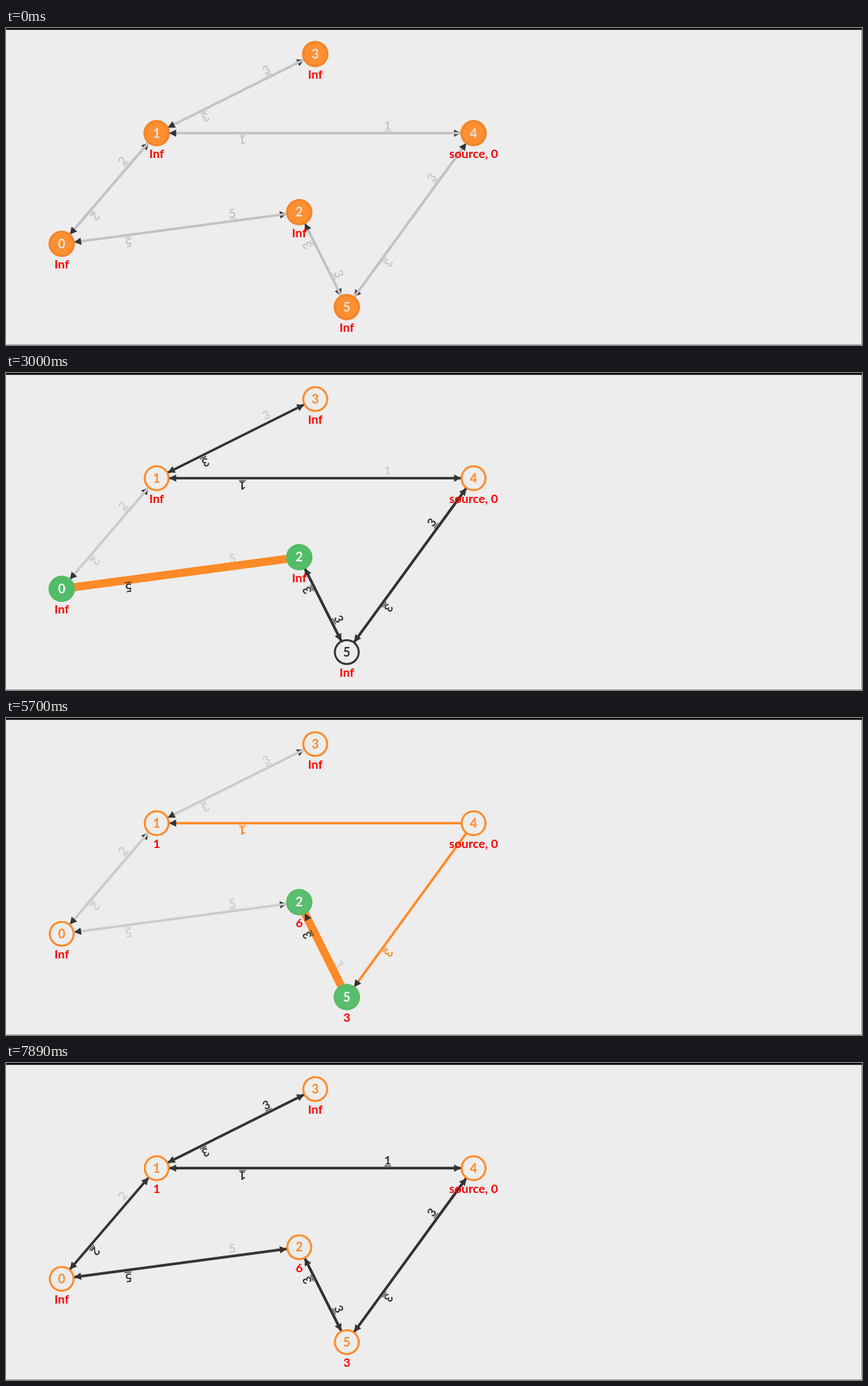
An HTML page with a canvas for the animation above (8 s loop, 1229 by 456 pixels).

```html
<!DOCTYPE html>
<html lang="en">
<head>
<meta charset="utf-8">
<title>Bellman-Ford relaxation</title>
<style>
  html, body { margin: 0; width: 100%; height: 100%; overflow: hidden; background: #ededed; }
  canvas { display: block; }
</style>
</head>
<body>
<canvas id="stage" width="1229" height="456"></canvas>
<script>
const ctx = document.getElementById('stage').getContext('2d');
const LOOP = 8000, STEP = 259.2, LEAD = 45, FADE = 190;
const FONT = 'Lato, "Open Sans", sans-serif';

const BG = [237, 237, 237], DARK = [51, 51, 51], GRAY = [204, 204, 204];
const ORANGE = [255, 138, 39], GREEN = [82, 188, 105], WHITE = [255, 255, 255];
const THIN = 3.5, THICK = 11.5;

const nodes = [[80, 310.5], [216.3, 151.3], [421, 265], [444, 37.5], [671.3, 151.3], [489.3, 401.5]];
const SOURCE = 4;
// [from, to, weight] in the order of relaxation
const edges = [
  [0, 1, 2], [0, 2, 5], [1, 0, 2], [1, 3, 3], [1, 4, 1], [2, 0, 5],
  [2, 5, 3], [3, 1, 3], [4, 1, 1], [4, 5, 3], [5, 2, 3], [5, 4, 3]
];
const reverse = edges.map(([u, v]) => edges.findIndex(e => e[0] === v && e[1] === u));

const look = {
  idle: { ring: DARK, fill: BG, text: DARK, r: 18.6 },
  seen: { ring: ORANGE, fill: BG, text: ORANGE, r: 18.6 },
  full: { ring: ORANGE, fill: ORANGE, text: BG, r: 19 },
  active: { ring: GREEN, fill: GREEN, text: WHITE, r: 19 }
};

// Runs the algorithm and records every step as a picture state.
function buildStates() {
  const states = [];
  const dist = nodes.map((_, i) => i === SOURCE ? 0 : Infinity);
  const seen = nodes.map(() => false);
  let color, shown;

  const resetEdges = c => {
    color = edges.map(() => c);
    shown = edges.map(() => 1);
  };

  function record(active = -1, filled = false) {
    const ends = active < 0 ? [] : edges[active].slice(0, 2);
    states.push({
      dist: dist.slice(),
      nodes: nodes.map((_, i) => ends.includes(i) ? look.active
        : filled ? look.full : seen[i] ? look.seen : look.idle),
      edges: edges.map((_, i) => {
        const hot = active >= 0 && (i === active || i === reverse[active]);
        const lone = color[i] === GRAY && color[reverse[i]] !== GRAY;
        return {
          line: hot ? ORANGE : color[i],
          width: hot ? THICK : THIN,
          alpha: hot ? 1 : shown[i],
          arrow: hot ? 0 : shown[i],
          label: color[i],
          labelAlpha: shown[i],
          underline: lone ? 0 : shown[i]
        };
      })
    });
  }

  for (let pass = 0; pass < 2; pass++) {
    resetEdges(GRAY);
    record(-1, true);
    resetEdges(DARK);
    record();
    edges.forEach(([u, v, w], i) => {
      record(i);
      seen[u] = seen[v] = true;
      if (dist[u] + w < dist[v]) {
        dist[v] = dist[u] + w;
        color[i] = ORANGE;
        shown[reverse[i]] = 0;
      } else {
        color[i] = GRAY;
      }
      record();
    });
  }
  return states;
}

const states = buildStates();
const mix = (a, b, k) => a + (b - a) * k;
const ease = x => x < .5 ? 4 * x ** 3 : 1 - 4 * (1 - x) ** 3;
const rgb = (a, b, k) => `rgb(${a.map((c, i) => Math.round(mix(c, b[i], k)))})`;

function text(str, x, y, size) {
  ctx.font = `bold ${size}px ${FONT}`;
  ctx.fillText(str, x, y);
}

function disc(x, y, r, fill) {
  ctx.fillStyle = fill;
  ctx.beginPath();
  ctx.arc(x, y, r, 0, 2 * Math.PI);
  ctx.fill();
}

function drawEdge([u, v, w], a, b, k) {
  const [x, y] = nodes[u], dx = nodes[v][0] - x, dy = nodes[v][1] - y;
  const length = Math.hypot(dx, dy), end = length - 18;
  ctx.save();
  ctx.translate(x, y);
  ctx.rotate(Math.atan2(dy, dx));

  const width = mix(a.width, b.width, k);
  ctx.globalAlpha = mix(a.alpha, b.alpha, k);
  ctx.fillStyle = rgb(a.line, b.line, k);
  ctx.fillRect(18, -width / 2, end - 18, width);

  // Arrowheads switch at once, without a fade.
  if (b.arrow) {
    ctx.globalAlpha = 1;
    ctx.fillStyle = rgb(DARK, DARK, 0);
    ctx.beginPath();
    ctx.moveTo(end, 0);
    ctx.lineTo(end - 10, -5.3);
    ctx.lineTo(end - 10, 5.3);
    ctx.fill();
  }

  const at = 19 + .75 * (length - 38);
  ctx.globalAlpha = mix(a.labelAlpha, b.labelAlpha, k);
  ctx.fillStyle = rgb(a.label, b.label, k);
  text(w, at, -5, 17);
  ctx.globalAlpha = mix(a.underline, b.underline, k);
  ctx.fillRect(at - 5, -4, 10, 1.2);
  ctx.restore();
}

function drawNode(i, a, b, k) {
  const [x, y] = nodes[i];
  disc(x, y, mix(a.r, b.r, k), rgb(a.ring, b.ring, k));
  disc(x, y, 15.7, rgb(a.fill, b.fill, k));
  ctx.fillStyle = rgb(a.text, b.text, k);
  text(i, x, y + 6.2, 18);
}

function draw(t) {
  const step = Math.floor((t + LEAD) / STEP);
  const k = ease(Math.min(1, (t + LEAD - step * STEP) / FADE));
  const from = states[step], to = states[step + 1];

  ctx.fillStyle = rgb(BG, BG, 0);
  ctx.fillRect(0, 0, 1229, 456);
  ctx.fillStyle = '#a0a0a0';
  ctx.fillRect(1228, 0, 1, 456);
  ctx.fillRect(0, 455, 1229, 1);
  ctx.fillStyle = '#000';
  ctx.fillRect(0, 0, 1229, 2.6);

  ctx.textAlign = 'center';
  edges.forEach((e, i) => drawEdge(e, from.edges[i], to.edges[i], k));
  nodes.forEach(([x, y], i) => {
    drawNode(i, from.nodes[i], to.nodes[i], k);
    const d = to.dist[i] === Infinity ? 'Inf' : to.dist[i];
    ctx.fillStyle = '#f00';
    text(i === SOURCE ? `source, ${d}` : d, x, y + 35.7, 17.5);
  });
}

const start = performance.now();
function tick() {
  draw((performance.now() - start) % LOOP);
  requestAnimationFrame(tick);
}
tick();
</script>
</body>
</html>
```
